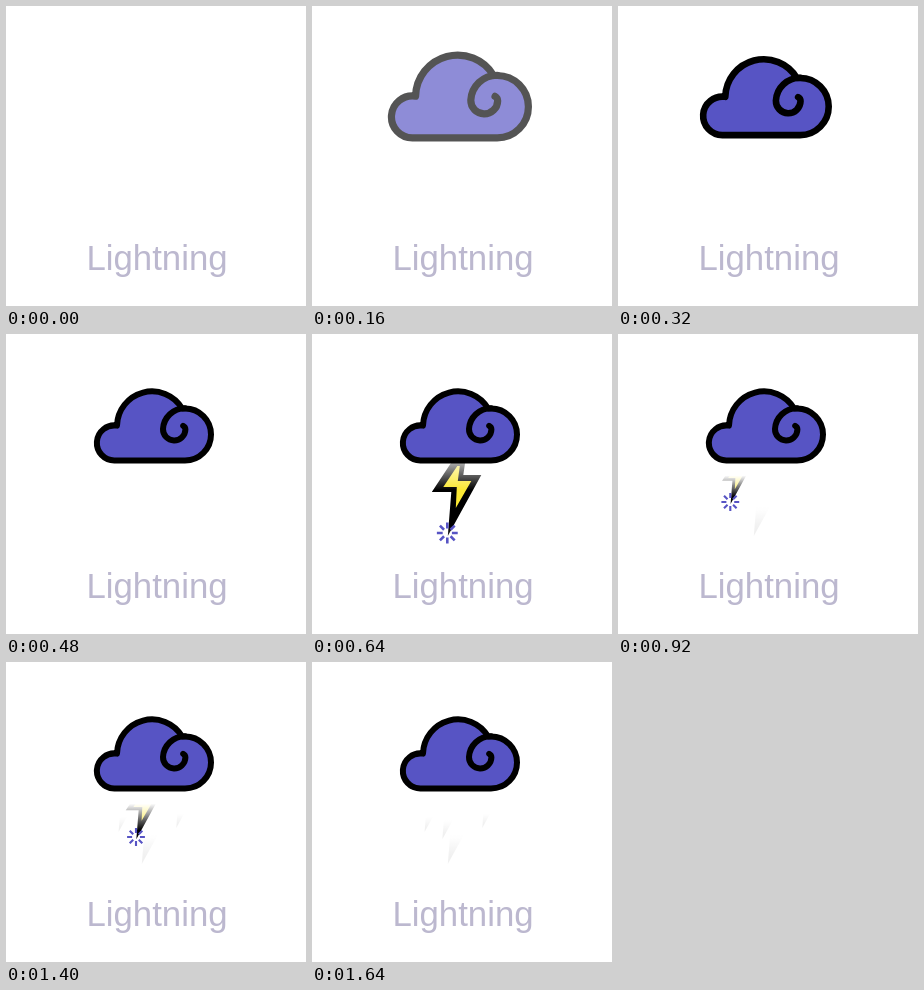
An HTML page that plays this animation: 300x300 px, repeating every 2.92 s.

```html
<!DOCTYPE html>
<html lang="en">
<head>
<meta charset="utf-8">
<title>Lightning</title>
<style>
  html, body { margin: 0; width: 100%; height: 100%; overflow: hidden; background: #fff; }
  svg { display: block; width: 100vw; height: 100vh; }
  text { font: 34.8px "Liberation Sans", Arial, sans-serif; fill: #bcb8cf; }
</style>
</head>
<body>
<svg viewBox="0 0 300 300">
  <defs id="defs">
    <g id="bolt">
      <path d="M7-76H18.5L16-59H34L.5 2L4-42H-15.5Z"/>
      <path d="M10-68H12.5L10.5-53H24L8.5-26L9.5-47H-4Z" fill="#fbe833"/>
    </g>
  </defs>
  <g id="bolts"></g>
  <g id="cloud" stroke="#000" stroke-width="6" stroke-linecap="round" stroke-linejoin="round">
    <path fill="#5754c4" d="M108.5 126.4A17.5 17.5 0 1 1 111 91.6A35 35 0 0 1 176 74.4H179A26 26 0 0 1 179 126.4Z"/>
    <path fill="none" d="M179 74.2A22 22 0 0 0 157 95A11.2 11.2 0 0 0 179.4 95.5Q179.4 93 177.2 91.8"/>
  </g>
  <text x="151" y="264.4" text-anchor="middle">Lightning</text>
</svg>
<script>
const LOOP = 2920, STEP = 40;
const $ = id => document.getElementById(id);
const clamp = (v, lo = 0, hi = 1) => Math.min(hi, Math.max(lo, v));

function add(parent, tag, attrs) {
  const el = document.createElementNS("http://www.w3.org/2000/svg", tag);
  for (const key in attrs) el.setAttribute(key, attrs[key]);
  parent.append(el);
  return el;
}

// Bolts are placed by their tip
const bolts = [
  { start: 480, x: 135.3, y: 200, size: 1, spark: 1 },
  { start: 720, x: 112.3, y: 169, size: .53, spark: .84 },
  { start: 960, x: 170, y: 165, size: .5, spark: .84 },
  { start: 1200, x: 130, y: 176, size: .66, spark: .84 }
];

bolts.forEach((b, i) => {
  const grad = add($("defs"), "linearGradient",
    { id: "fade" + i, gradientUnits: "userSpaceOnUse", x1: 0, x2: 0, y1: -80, y2: 4 });
  b.stops = [];
  for (let y = -80; y <= 4; y += 4) {
    b.stops.push({ y, el: add(grad, "stop", { offset: (y + 80) / 84, "stop-color": "#fff" }) });
  }
  const area = { x: -20, y: -80, width: 60, height: 90 };
  const mask = add($("defs"), "mask", { id: "mask" + i, maskUnits: "userSpaceOnUse", ...area });
  add(mask, "rect", { ...area, fill: `url(#fade${i})` });
  b.shape = add($("bolts"), "g", { transform: `translate(${b.x} ${b.y}) scale(${b.size})` });
  add(b.shape, "use", { href: "#bolt", mask: `url(#mask${i})` });
  b.burst = add($("bolts"), "path",
    { stroke: "#5754c4", transform: `translate(${b.x} ${b.y - 1}) scale(${b.spark})` });
});

function spokes(inner, outer) {
  let d = "";
  for (let k = 0; k < 8; k++) {
    const c = Math.cos(k * Math.PI / 4), s = Math.sin(k * Math.PI / 4);
    d += `M${c * inner} ${s * inner}L${c * outer} ${s * outer}`;
  }
  return d;
}

function drawBolt(b, t) {
  const age = t - b.start;
  b.shape.style.display = age > 0 ? "" : "none";
  const lit = age >= 120 && age < 440;
  b.burst.style.display = lit ? "" : "none";

  // Soft edges: the lower one reveals the bolt, the upper one wipes it away
  const top = -84 + .8 * (age - 160);
  const bottom = -64 + .7 * age;
  for (const { y, el } of b.stops) {
    const body = clamp((y - top) / 40) * clamp((bottom - y) / 55);
    const trace = age > 160 ? .06 * clamp((y + 26) / 20) : 0;
    el.setAttribute("stop-opacity", Math.max(body, trace));
  }

  if (lit) {
    const p = clamp((age - 120) / 280) ** 3;
    b.burst.setAttribute("d", spokes(4.6 + 3 * p, 10.4 + 8.6 * p));
    b.burst.setAttribute("stroke-width", Math.max(2.6 - 4 * p, .4));
  }
}

function render(t) {
  const scale = t < 160 ? 1.2 * t / 160 : 1.2 - .2 * clamp((t - 160) / 320);
  $("cloud").setAttribute("transform", `translate(148 99) scale(${scale}) translate(-148 -99)`);
  $("cloud").setAttribute("opacity", clamp(t / 240));
  bolts.forEach(b => drawBolt(b, t));
}

let origin;
function tick(now) {
  origin ??= now;
  render(Math.floor((now - origin) % LOOP / STEP) * STEP);
  requestAnimationFrame(tick);
}
render(0);
requestAnimationFrame(tick);
</script>
</body>
</html>
```
